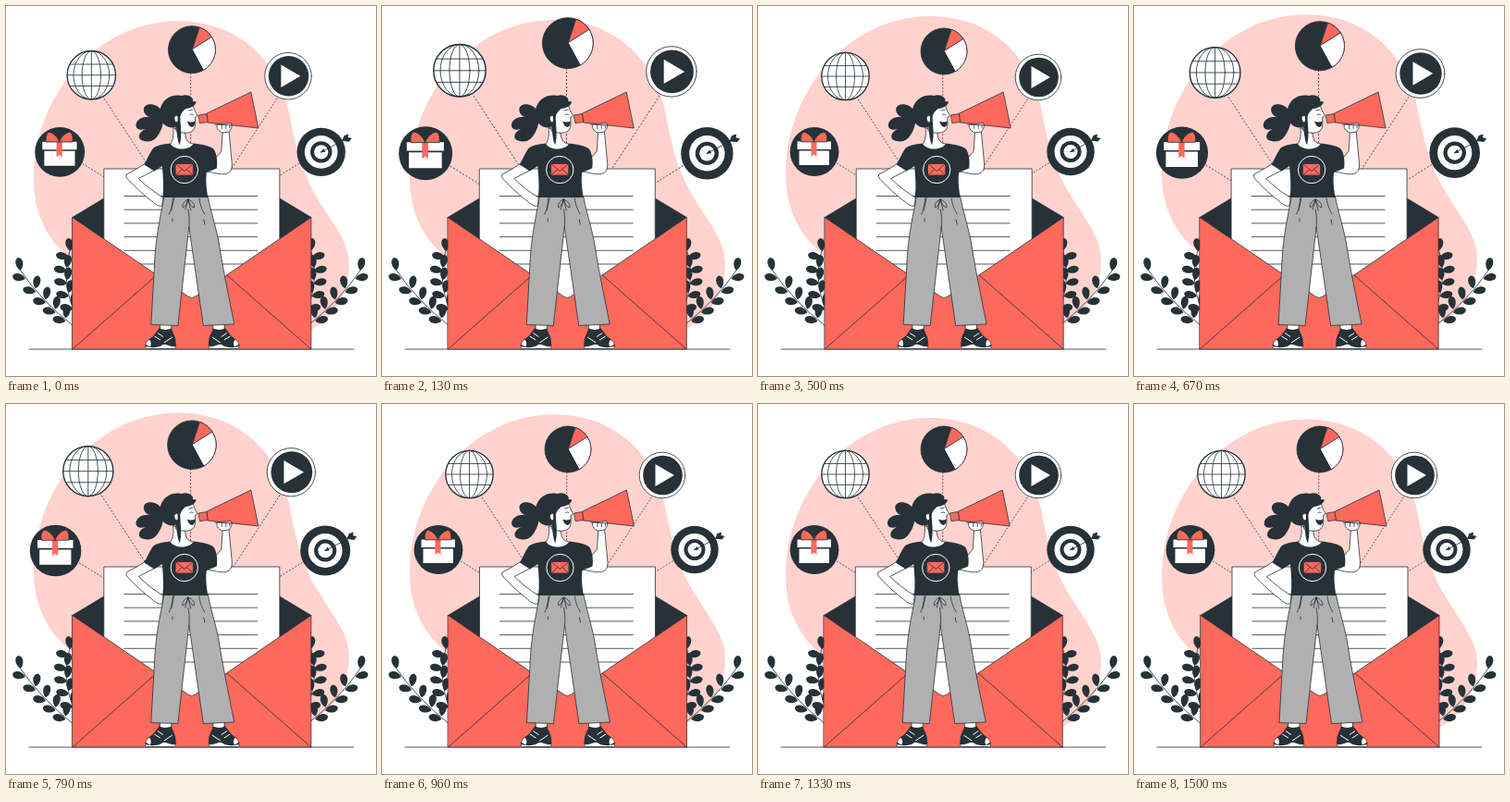
Recreate the animation shown at these times as an HTML page. Size 400 by 400 pixels, loop 1540 ms.

```html
<!DOCTYPE html>
<html lang="en">
<head>
<meta charset="utf-8">
<title>Newsletter</title>
<style>
  html, body { margin: 0; width: 100%; height: 100%; overflow: hidden; background: #fff; }
  svg { display: block; width: 100%; height: 100%; }
  .d { fill: #263238; }
  .r { fill: #ff695c; }
  .w { fill: #fff; }
  .l { stroke: #263238; stroke-width: .8; stroke-linejoin: round; stroke-linecap: round; }
  .n { fill: none; }
  .dots { stroke-dasharray: 1.8 1.8; stroke-linecap: butt; }
</style>
</head>
<body>
<svg viewBox="0 0 400 400">
  <path id="blob" fill="#ffd2ce" d="M185 16.5C250 16 294 58 306 115C313 153 320 180 336 207C351 233 372 255 371 282C370 312 355 338 325 353L80 300L72 275C45 255 30 225 30 188C30 95 100 17 185 16.5Z"/>
  <g id="plants"></g>

  <g id="icons">
    <path class="l n dots" d="M200 241L70 160.500M200 241L94.500 80M199.700 241V60M200 241L303.500 82M200 241L330 160"/>

    <g id="gift">
      <circle class="d" cx="61" cy="157.500" r="26.400"/>
      <path class="w" d="M42.500 146.500H79V155H42.500ZM44.500 156.500H77V172H44.500Z"/>
      <path class="r" d="M57.500 146.500H63.500V163L60.500 160.500L57.500 163Z"/>
      <path class="r l" d="M60.500 146.500C58 140 52 136 49 136.500C46 139 46 143 46.500 146.500ZM60.500 146.500C63 140 69 136 72 136.500C75 139 75 143 74.500 146.500Z"/>
    </g>

    <g id="globe" class="l n">
      <circle class="w" cx="94.500" cy="76" r="25.700" stroke-width="1.300"/>
      <ellipse cx="94.500" cy="76" rx="10" ry="25.700"/>
      <ellipse cx="94.500" cy="76" rx="19" ry="25.700"/>
      <path d="M94.500 50.500V101.500M69 76H120M71.500 64.500H117.500M71.500 87.500H117.500"/>
    </g>

    <g id="pie" class="l">
      <circle class="d" cx="201" cy="49" r="25"/>
      <path class="r" d="M201.400 48.500L209 25.300A25 25 0 0 1 222 35.500Z"/>
      <path class="w" d="M201.400 48.500L222 35.500A25 25 0 0 1 213.500 70.700Z"/>
    </g>

    <g id="play">
      <circle class="w l" cx="303" cy="77" r="24.800"/>
      <circle class="d" cx="303.500" cy="77" r="21.300"/>
      <path class="w" d="M295.500 65L316 77L295.500 89Z"/>
    </g>

    <g id="target">
      <circle class="d" cx="338" cy="157.500" r="25.700"/>
      <circle class="w" cx="338" cy="157.500" r="17.500"/>
      <circle class="d" cx="338" cy="157.500" r="11.500"/>
      <circle class="w" cx="338" cy="157.500" r="7.500"/>
      <path class="l" d="M338 157.500L363 144.500"/>
      <path class="d" d="M337 158L340.500 154L342.500 157.500ZM360 145.500L362.500 140L367 138.500L366.500 142L370.500 143L367.500 146.500Z"/>
    </g>
  </g>

  <path class="l n" d="M25 371H376"/>

  <g id="card">
    <path class="d l" d="M72 228.500L106 208V256ZM330 228.500L296 208V256Z"/>
    <path class="w l" d="M106 325V176H296V325Z"/>
    <g id="lines" class="l"></g>
    <path class="r l" d="M72 228.500L197 314Q201 317 205 314L330 228.500V371H72Z"/>
    <path class="l n" d="M72 371L163 291M330 371L239 291"/>

    <g id="shoe">
      <path class="w l" d="M167 343H179V352H167Z"/>
      <path class="w l" d="M151 366Q150 370.500 153 370.500H182Q184.500 370 183.500 365Z"/>
      <path class="d" d="M166 348C170 351 175 350 179 348.500C180 354 185 357 183.500 368C178 369.500 174 365 170 366C165 369.500 157 370 151 368C150 362 156 360 160 356Z"/>
      <path fill="none" stroke="#fff" d="M160.500 357L167 361M164 353.500L170 357.500M171 364L180 358"/>
      <path class="w" d="M151.500 366Q152.500 361.500 155.500 361Q158 364.500 156 368.500Z"/>
    </g>
    <use href="#shoe" transform="matrix(-1 0 0 1 403 0)"/>

    <path class="l" fill="#b0b0b0" d="M171 206C168 226 162 245 160.500 283L157 344.500L186 345.500L198 239L213.500 345.500L247 344C240 310 234 280 230 254C226 235 221 220 218.500 206Z"/>
    <path class="l n" d="M198 239C199 231 198 225 197 220M180.500 208C180 216 178 222 176.500 225M182 207L179 221M209 208C210 216 213 222 215 225M180 230V233M214 231L215 236"/>
    <path class="l" fill="#b0b0b0" d="M197 209C192 211 190 216 191.500 218C194 217 196 213 197 209C202 211 205 215 203.500 218C200 217 198 213 197 209L194 220M197 209L200 221"/>

    <path class="w l" d="M152 169C146 174 138 178 130.500 182Q129 184.500 132 187.500C141 197 151 206 158 211C162 215 166 217 169 216L170 207C161 202 151 194 143.500 186.500L160 178Z"/>
    <path class="w l" d="M216 178.500C224 180 231 182.500 238 181.500Q245 180 244.500 171L241 134H234.500L233 157L227 164Z"/>
    <path class="w l" d="M181 132C181.500 140 181 146 177 150C184 159 199 158 203 149C197 149 194 144 194 138Z"/>
    <path class="d" d="M177.500 148.500C170 149.500 163 150.500 159 154C155 160 152.500 166 149.500 171.500L160.500 178.500L169 173C170 185 171 196 169.500 207H218.500C216.500 195 216 188 217 180L228 175.500C229 168 228 160 225 155C221 151 212 149.500 203.500 148.500C199 156 183 157 177.500 148.500Z"/>

    <path class="d" d="M168.500 113C164 105 150 103.500 149 111.500C149 116.500 152 119 156 120C147 119 139 124 141 131C143 134.500 147 134 151 133C143 136 141 145 150 146C157 148 162 144 165 139C169 133 171 126 170 118Z"/>
    <path class="w l" d="M183 112L202 106C203 111 205 115 207 118Q206.500 120 204.500 120.500C205 127 205 132 202 135C198 138 190 138 184 135Z"/>
    <path class="d" d="M167 121C164 106 175 94 190 97C196 94.500 204 99 202 103L206 103.500C204 109 199 110.500 194.500 111C190.500 114 188 118 188.500 122C189 132 190.500 141 188 150C186 148 185 139 184 130C180 134 169 130 167 121Z"/>
    <path class="w l" d="M186 119C182 117 180.500 122 184 126L186 125Z"/>
    <path class="d" d="M196 124.500Q200 126.500 204.500 124.500Q204.500 131 201 131Q197.500 130 196 124.500Z"/>
    <path class="l n" d="M199 117.500Q201 116 202.500 117.500M198 113L202 112"/>

    <g id="megaphone">
      <path class="r l" d="M217.500 116L265 93L273 132L218.500 126Z"/>
      <path class="r l" d="M208.500 118L217 116.500L218.500 125.500L210 126.500Z"/>
      <path class="w l" d="M228.500 128C227 131 229 135 234 137L241 136C244 133 245 130 243.500 127Z"/>
      <path class="l n" d="M226 128L245 129M233.500 128.500V132.500M238 129V132.500M242 129V132" stroke-width="1.600"/>
    </g>

    <circle cx="193" cy="177" r="14.700" fill="none" stroke="#fff"/>
    <path class="r l" d="M183.500 170.500H202.500V183H183.500Z"/>
    <path class="l n" d="M183.500 170.500L193 178.500L202.500 170.500M183.500 183L190.500 176.500M202.500 183L195.500 176.500"/>
  </g>
</svg>
<script>
const $ = id => document.getElementById(id);

for (let i = 0; i < 6; i++)
  $('lines').innerHTML += `<path d="M128 ${205.5 + 14.7 * i}H272"/>`;

// Plants: pairs of leaves, one upright and one flat, along a curved stem
const leaf = (x, y, turn) =>
  `<path class="d" d="M0 7C-5.300 3 -5.300 -6 0 -7C5.300 -6 5.300 3 0 7Z" transform="translate(${x} ${y}) rotate(${turn})"/>`;

function plant(a, c, b, stops) {
  let out = `<path class="l n" d="M${a}Q${c} ${b}"/>` + leaf(b[0] - .5, b[1] - 6, -10);
  stops.forEach((t, i) => {
    const [x, y] = [0, 1].map(k => (1 - t) ** 2 * a[k] + 2 * t * (1 - t) * c[k] + t * t * b[k]);
    out += leaf(x - 6.5, y + .5, -78);
    if (i < stops.length - 1) out += leaf(x + 1.5, y - 8.5, 10);
  });
  return out;
}
const pair =
  plant([74, 347], [37, 318], [15, 285], [.14, .3, .47, .66, .88]) +
  plant([78, 340], [58, 300], [69, 264], [.18, .36, .54, .72, .92]);
$('plants').innerHTML = `<g>${pair}</g><g transform="matrix(-1 0 0 1 398.600 0)">${pair}</g>`;

// Motion: [share of the cycle, value], straight lines between
const LOOP = 1540, STEP = LOOP / 37, CYCLE = 1500, LEAD = 30;
const tracks = {
  float: [[0, 0], [.5, -7.7], [1, 0]],
  beat: [[0, 1], [.1, 1.1], [.3, 1], [.4, 1], [.5, 1.1], [.6, 1], [1, 1]],
  shake: [[0, 0], [.1, -.8], [.2, 1.6], [.3, -3.2], [.4, 3.2], [.5, -3.2],
          [.6, 3.2], [.7, -3.2], [.8, 1.6], [.9, -.8], [1, 0]]
};
function value(track, p) {
  const i = Math.max(1, track.findIndex(k => k[0] >= p));
  const [p0, v0] = track[i - 1], [p1, v1] = track[i];
  return v0 + (v1 - v0) * (p - p0) / (p1 - p0);
}

const start = performance.now();
function draw(now) {
  const t = Math.max(0, now - start) % LOOP;
  const tick = Math.floor((t + 3) / STEP) % 37;   // 24 pictures a second
  const p = Math.min(1, (tick * STEP + LEAD) / CYCLE);
  const s = value(tracks.beat, p);
  $('blob').setAttribute('transform', `translate(0 ${value(tracks.float, p)})`);
  $('icons').setAttribute('transform', `translate(202 139) scale(${s}) translate(-202 -139)`);
  $('card').setAttribute('transform', `translate(${value(tracks.shake, p)} 0)`);
  requestAnimationFrame(draw);
}
draw(start);
</script>
</body>
</html>
```
